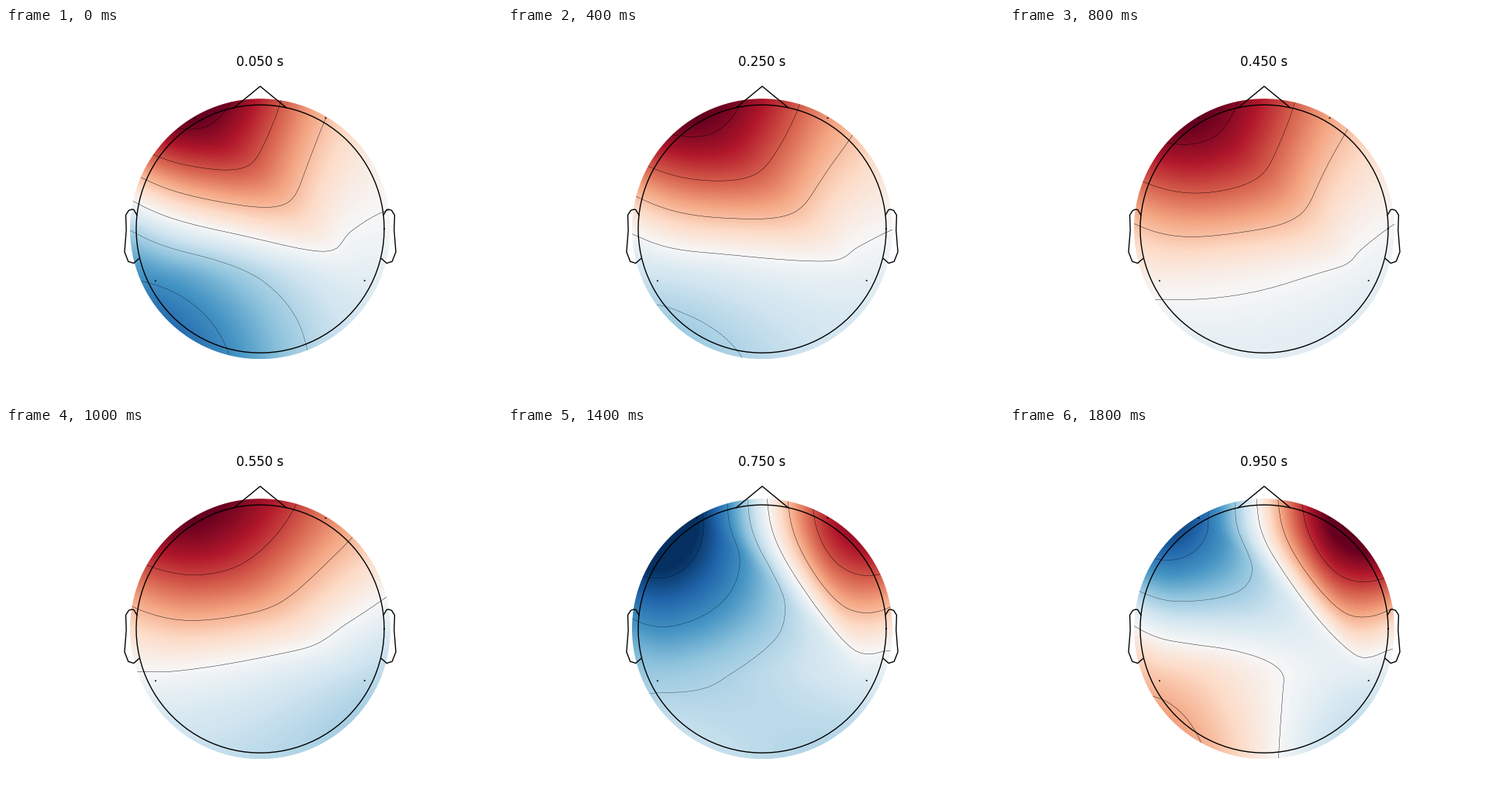
Recreate the animation shown at these times as a matplotlib script. Size 640 by 480 pixels, loop 2 s.

```python
import numpy as np
import matplotlib.pyplot as plt
from matplotlib.animation import FuncAnimation
from matplotlib.patches import Circle
from matplotlib.tri import Triangulation

W, H, DPI = 640, 480, 100
CX, CY, SCALE = 328, 259.2, 160      # head centre and radius in pixels
MASK = 1.05                          # map radius in head radii
N_FRAMES, INTERVAL = 10, 200

# Front left, front right, back left, back right
SENSORS = np.array([(-0.528, 0.894), (0.528, 0.894),
                    (-0.844, -0.419), (0.842, -0.417)])

# Sensor potentials in contour steps, by frame; the rest are interpolated
KEYS = {
    0: (3.2, 1.0, -1.93, -0.35),
    2: (3.3, 1.45, -0.7, -0.3),
    4: (3.33, 1.32, 0.2, -0.24),
    6: (2.55, 1.68, -0.42, -1.25),
    7: (-3.2, 2.42, -1.12, -0.42),
    8: (-0.6, 3.3, 0.36, -0.52),
    9: (-2.25, 2.8, 0.8, -0.36),
}


class Scalp:
    """Clough-Tocher interpolation, kept linear in the sensor values."""

    def __init__(self, sensors, ring_radius, n_ring=12):
        n = len(sensors)
        a = np.arange(n_ring) * 2 * np.pi / n_ring
        ring = ring_radius * np.column_stack([np.cos(a), np.sin(a)])
        self.pts = np.vstack([sensors, ring])
        self.tri = Triangulation(*self.pts.T)
        self.find = self.tri.get_trifinder()
        self.links = np.vstack([self.tri.edges, self.tri.edges[:, ::-1]])
        # Ring points take the mean of the sensors they touch
        self.f = np.zeros((len(self.pts), n))
        self.f[:n] = np.eye(n)
        for i, j in self.links:
            if i >= n > j:
                self.f[i, j] = 1
        self.f /= np.maximum(self.f.sum(axis=1, keepdims=True), 1)
        self.grad = self.gradients()

    def gradients(self):
        """Vertex gradients with the least curvature along the edges."""
        n, m = self.f.shape
        lhs = np.zeros((2 * n, 2 * n))
        rhs = np.zeros((2 * n, m))
        for i, j in self.links:
            e = self.pts[j] - self.pts[i]
            w = np.linalg.norm(e) ** -3
            ee = w * np.outer(e, e)
            si, sj = slice(2 * i, 2 * i + 2), slice(2 * j, 2 * j + 2)
            lhs[si, si] += 4 * ee
            lhs[si, sj] += 2 * ee
            rhs[si] += 6 * w * np.outer(e, self.f[j] - self.f[i])
        return np.linalg.solve(lhs, rhs).reshape(n, 2, m)

    def barycentric(self, t, xy):
        corners = self.pts[self.tri.triangles[t]]
        return np.linalg.solve(np.vstack([corners.T, np.ones(3)]),
                               np.vstack([xy.T, np.ones(len(xy))]))

    def patch(self, t, xy):
        v = self.tri.triangles[t]
        p, f, grad = self.pts[v], self.f[v], self.grad[v]

        def ctrl(i, j):
            return f[i] + (p[j] - p[i]) @ grad[i] / 3

        trios = [(k, (k + 1) % 3, (k + 2) % 3) for k in range(3)]
        near = [(f[k] + ctrl(k, i) + ctrl(k, j)) / 3 for k, i, j in trios]
        edge = []
        for k, i, j in trios:
            g = -0.5
            other = self.tri.neighbors[t, i]
            if other >= 0:
                mid = self.pts[self.tri.triangles[other]].mean(axis=0)
                c = self.barycentric(t, mid[None])[:, 0]
                g = (2 * c[j] + c[i] - 1) / (2 - 3 * c[j] - 3 * c[i])
            a, b = ctrl(i, j), ctrl(j, i)
            edge.append((g * (f[j] - f[i] + 3 * (a - b))
                         - f[i] + 2 * a - b + near[i] + near[j]) / 2)
        inner = [(near[k] + edge[i] + edge[j]) / 3 for k, i, j in trios]

        b = self.barycentric(t, xy)
        low = b.min(axis=0)
        b = b - low
        c = 3 * low
        out = np.outer(c ** 3, sum(inner) / 3)
        for k, i, j in trios:
            out += np.outer(b[k] ** 3, f[k])
            out += 3 * np.outer(b[k] ** 2 * c, near[k])
            out += 3 * np.outer(b[k] * c ** 2, inner[k])
            out += 3 * np.outer(b[k] ** 2 * b[i], ctrl(k, i))
            out += 3 * np.outer(b[k] ** 2 * b[j], ctrl(k, j))
            out += 6 * np.outer(b[i] * b[j] * c, edge[k])
        return out

    def basis(self, xy):
        """Weight of every sensor at every point."""
        found = self.find(xy[:, 0], xy[:, 1])
        out = np.zeros((len(xy), self.f.shape[1]))
        for t in np.unique(found[found >= 0]):
            sel = found == t
            out[sel] = self.patch(t, xy[sel])
        return out


key_frames = list(KEYS)
values = np.column_stack([np.interp(range(N_FRAMES), key_frames, series)
                          for series in zip(*KEYS.values())])

scalp = Scalp(SENSORS, ring_radius=1.1 * MASK + 1.6)
axis = np.linspace(-MASK, MASK, 64)
X, Y = np.meshgrid(axis, axis)
weights = scalp.basis(np.column_stack([X.ravel(), Y.ravel()]))
maps = [(weights @ v).reshape(X.shape) for v in values]

fig = plt.figure(figsize=(W / DPI, H / DPI), dpi=DPI, facecolor="white")
ax = fig.add_axes([0, 0, 1, 1])
image = ax.imshow(maps[0], cmap="RdBu_r", origin="lower", aspect="auto",
                  extent=(-MASK, MASK, -MASK, MASK), interpolation="bilinear")
ax.set_xlim(-CX / SCALE, (W - CX) / SCALE)
ax.set_ylim((CY - H) / SCALE, CY / SCALE)
ax.set_autoscale_on(False)
ax.axis("off")
clip = Circle((0, 0), MASK, transform=ax.transData)
image.set_clip_path(clip)


def outline(x, y):
    ax.plot(x, y, color="k", lw=1)


turn = np.linspace(0, 2 * np.pi, 101)
outline(np.cos(turn), np.sin(turn))
nose = np.deg2rad(12)
nose_y = np.sqrt(1 - nose ** 2)
outline([-nose, 0, nose], [nose_y, 1.15, nose_y])
ear_x, ear_y = np.array([
    (0.994, 0.111), (1.020, 0.155), (1.036, 0.157), (1.060, 0.149),
    (1.084, 0.111), (1.080, -0.011), (1.094, -0.186), (1.064, -0.263),
    (1.020, -0.277), (0.978, -0.240)]).T
for side in (-1, 1):
    outline(side * ear_x, ear_y)
ax.scatter(*SENSORS.T, s=0.25, marker="o", edgecolor="k", facecolor="none")
title = ax.text(0, (CY - 49.27) / SCALE, "", ha="center", va="baseline",
                fontsize=12, family="DejaVu Sans")
contours = None


def update(n):
    global contours
    if contours is not None:
        contours.remove()
    limit = np.abs(values[n]).max()
    image.set_data(maps[n])
    image.set_clim(-limit, limit)
    contours = ax.contour(X, Y, maps[n], np.arange(-3, 4),
                          colors="k", linewidths=0.3)
    contours.set_clip_path(clip)
    title.set_text(f"{0.05 + 0.1 * n:.3f} s")
    return image, title


anim = FuncAnimation(fig, update, frames=N_FRAMES, interval=INTERVAL,
                     repeat=True, repeat_delay=0, blit=False)
plt.show()
```
